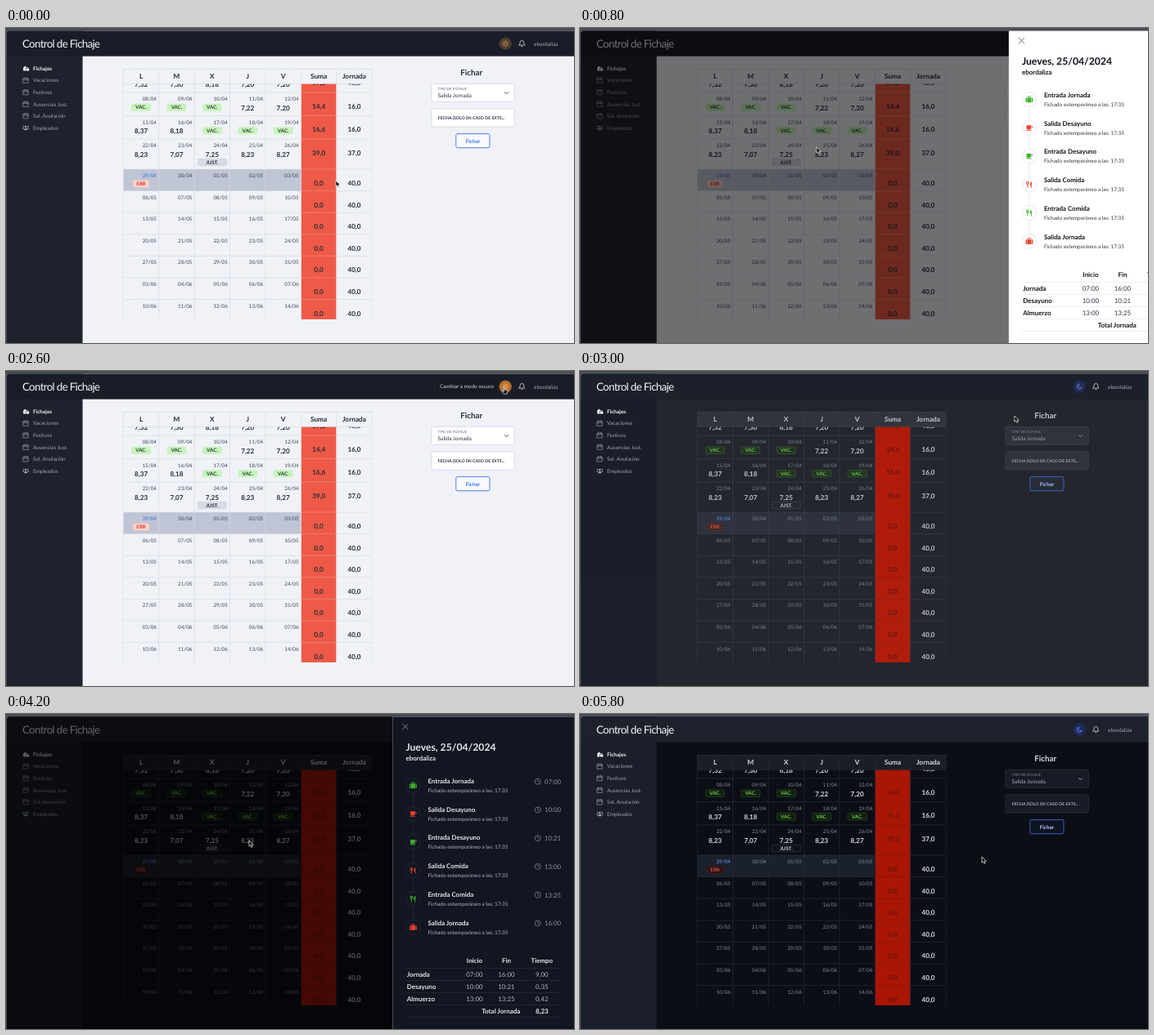
An HTML page that plays this animation: 694 by 386 pixels, repeating every 5.9 s.

```html
<!DOCTYPE html>
<html lang="es">
<head>
<meta charset="utf-8">
<title>Control de Fichaje</title>
<style>
html, body { margin: 0; width: 100%; height: 100%; overflow: hidden; background: #4b4e54; }
svg { display: block; width: 100vw; height: 100vh; font-family: Lato, "Open Sans", sans-serif; text-rendering: geometricPrecision; }
</style>
</head>
<body>
<svg id="stage" viewBox="0 0 694 386" preserveAspectRatio="none"></svg>
<script>
const LOOP = 5900, PANEL = 222, USER = 'ebordaliza';
const GREEN = '#3fae2e', RED = '#e8412f';

const light = {
  page: '#f0f2f8', bar: '#191d27', side: '#1e222d', head: '#f0f2f8', line: '#d9dce5',
  text: '#262c3a', date: '#3c4353', today: '#c0c5d5', todayDate: '#2f6be6',
  red: '#ee5a47', redText: '#2f2c38', redLine: '#f58a7b',
  vac: ['#c8f3bd', '#c8f3bd', '#28452a'], err: ['#fbd5cf', '#f3bdb4', '#d8321f'],
  just: ['#d9dce7', '#c9cdda', '#262c3a'],
  field: '#ffffff', fieldLine: '#cfd3dd', label: '#5a6070', value: '#2b3140',
  button: '#f8faff', blue: '#3a6fe6', buttonText: '#3a6fe6',
  disc: '#493c31', glyph: '#f0a04b',
  panel: '#ffffff', title: '#10131a', sub: '#2f3542', ring: '#e1e4ea', rule: '#e3e5ea', mute: '#5b6270'
};
const dark = {
  page: '#0c0e16', bar: '#1c212b', side: '#1a1f29', head: '#191e27', line: '#272b34',
  text: '#d3d7e0', date: '#868c98', today: '#1b212c', todayDate: '#6f9bf5',
  red: '#a91604', redText: '#6a150f', redLine: '#8c1509',
  vac: ['#10200f', '#2d5423', '#74c552'], err: ['#2a1412', '#4d211b', '#d8533c'],
  just: ['#0f131b', '#3b414d', '#d3d7e0'],
  field: '#161b25', fieldLine: '#2b313d', label: '#858b97', value: '#a8aeba',
  button: '#0e1420', blue: '#4169d8', buttonText: '#b9ccff',
  disc: '#1c2a5c', glyph: '#6488f5',
  panel: '#121621', title: '#e2e5ea', sub: '#b0b5bf', ring: '#262c37', rule: '#282e39', mute: '#8d939e'
};

const rect = (x, y, w, h, fill, extra = '') =>
  `<rect x="${x}" y="${y}" width="${w}" height="${h}" fill="${fill}" ${extra}/>`;
const path = (d, color, width = .8) =>
  `<path d="${d}" fill="none" stroke="${color}" stroke-width="${width}" stroke-linecap="round" stroke-linejoin="round"/>`;
const shape = (d, color) => `<path d="${d}" fill="${color}"/>`;
const at = (x, y, body, scale = 1) => `<g transform="translate(${x} ${y}) scale(${scale})">${body}</g>`;
// y is the middle of the capitals
const text = (x, y, s, size, fill, weight = 400, anchor = 'start', extra = '') =>
  `<text x="${x}" y="${y + size * .36}" font-size="${size}" fill="${fill}" font-weight="${weight}" text-anchor="${anchor}" ${extra}>${s}</text>`;
const mid = (x, y, s, size, fill, weight = 700) => text(x, y, s, size, fill, weight, 'middle');

const icons = {
  bag: c => path('M-1.3 -2V-3.4H1.3V-2', c, .8) + rect(-3.9, -2, 1.2, 5.2, c, 'rx=".5"') +
    rect(-2.2, -2, 4.4, 5.2, c) + rect(2.7, -2, 1.2, 5.2, c, 'rx=".5"'),
  cup: c => shape('M-3 -2.8H1.8V.2Q1.8 1.6 .4 1.6H-1.6Q-3 1.6 -3 .2ZM-3.6 2.2H2.8L2.2 3H-3Z', c) +
    path('M1.8 -2H2.5Q3.5 -2 3.5 -1T2.5 0H1.8', c, .8),
  food: c => path('M-2.9 -3V-1.2Q-2.9 0 -1.8 0T-.7 -1.2V-3M-1.8 -3V3.2', c, .8) +
    shape('M2.6 -3.3V3.5H1.8V.8H.7Q.6 -2.6 2.6 -3.3Z', c),
  calendar: c => path('M-3 -2.5H3V3.1H-3ZM-3 -.7H3M-1.4 -3.4V-2M1.4 -3.4V-2', c, .65),
  people: c => [[0, -1.4, 1.2], [-2.7, -1.7, .8], [2.7, -1.7, .8]]
    .map(([x, y, r]) => `<circle cx="${x}" cy="${y}" r="${r}" fill="${c}"/>`).join('') +
    shape('M-2.2 2.8Q-2 .4 0 .4T2.2 2.8ZM-4.1 1.3Q-3.9 -.4 -2.6 -.4L-2 .3L-2.8 1.3ZM4.1 1.3Q3.9 -.4 2.6 -.4L2 .3L2.8 1.3Z', c),
  entry: c => shape('M-3.8 0L-1 -3.2L1.6 -.6H-.4V3H-3V0Z', c) + rect(.2, .2, 3.8, 2.8, c, 'rx=".5"') +
    path('M1.2 0V-.9H3V0', c, .6),
  clock: c => `<circle r="3.5" fill="none" stroke="${c}" stroke-width=".7"/>` + path('M0 -2V0L1.3 .8', c, .7),
  bell: c => path('M-3.4 2H3.4Q2.4 1 2.4 -1Q2.4 -3.7 0 -3.7T-2.4 -1Q-2.4 1 -3.4 2ZM-.9 3.4Q0 4.3 .9 3.4', c, .75)
};

const colX = i => 143.4 + i * 43.4;
const weeks = [
  [50.5, '7,32 7,30 8,18 7,20 7,20', '37,2', '40,0'],
  [79, 'VAC. VAC. VAC. 7,22 7,20', '14,4', '16,0'],
  [107.5, '8,37 8,18 VAC. VAC. VAC.', '16,6', '16,0'],
  [136, '8,23 7,07 7,25+ 8,23 8,27', '39,0', '37,0'],
  [173, 'ERR', '0,0', '40,0']
];
for (let i = 1; i <= 6; i++) weeks.push([173 + 26.6 * i, '', '0,0', '40,0']);

function dayLabel(week, day) {
  const d = new Date(Date.UTC(2024, 3, 1 + week * 7 + day));
  const two = n => String(n).padStart(2, '0');
  return two(d.getUTCDate()) + '/' + two(d.getUTCMonth() + 1);
}

const badge = (x, y, w, label, [bg, border, color]) =>
  rect(x - w / 2, y - 4.3, w, 8.6, bg, `rx="1.2" stroke="${border}" stroke-width=".6"`) + mid(x, y, label, 6.2, color);

function cell(c, x, y, value) {
  if (value === 'VAC.') return badge(x, y + 18.2, 23, value, c.vac);
  if (value === 'ERR') return badge(x, y + 18, 19.5, value, c.err);
  if (!value) return '';
  return mid(x, y + 18.7, value.replace('+', ''), 8.2, c.text) +
    (value.endsWith('+') ? badge(x, y + 28.5, 35, 'JUST.', c.just) : '');
}

function calendar(c) {
  let s = rect(colX(0), 173, 217, 26.6, c.today) + rect(colX(5) + .5, 50, 42.6, 308, c.red);
  weeks.forEach(([y, days, sum, hours], w) => {
    const values = days.split(' ');
    s += path(`M${colX(0)} ${y}H${colX(5)}M${colX(6)} ${y}H${colX(7)}`, c.line, .7);
    s += path(`M${colX(5) + .5} ${y}H${colX(6) - .5}`, c.redLine, .7);
    for (let d = 0; d < 5; d++) {
      const isToday = w === 4 && d === 0;
      s += text(colX(d) + 40.6, y + 7.8, dayLabel(w, d), 6.25, isToday ? c.todayDate : c.date, 400, 'end');
      s += cell(c, colX(d) + 21.7, y, values[d]);
    }
    s += mid(colX(5) + 21.7, y + 17, sum, 8.3, c.redText) + mid(colX(6) + 21.7, y + 17, hours, 8.2, c.text);
  });
  for (let i = 0; i < 8; i++) s += path(`M${colX(i)} 50V358`, c.line, .7);
  s += rect(colX(0), 50.4, 303.8, 17.8, c.head, `stroke="${c.line}" stroke-width=".7"`);
  ['L', 'M', 'X', 'J', 'V', 'Suma', 'Jornada'].forEach((name, i) => {
    s += mid(colX(i) + 21.7, 59, name, 8.3, c.text);
    if (i) s += path(`M${colX(i)} 50.4V68`, c.line, .7);
  });
  return `<g clip-path="url(#tableClip)">${s}</g>`;
}

function sidebar() {
  const items = [['Fichajes', 'entry'], ['Vacaciones', 'calendar'], ['Festivos', 'calendar'],
    ['Ausencias Just.', 'calendar'], ['Sol. Anulación', 'calendar'], ['Empleados', 'people']];
  return items.map(([label, icon], i) => {
    const y = 49.6 + i * 14.55, color = i ? '#9ca2ae' : '#f4f5f8';
    return at(24.2, y, icons[icon](color)) + text(33, y, label, 6.45, color, i ? 400 : 700);
  }).join('');
}

function sun(color) {
  let rays = '';
  for (let i = 0; i < 8; i++) {
    const a = i * Math.PI / 4, x = Math.cos(a), y = Math.sin(a);
    rays += `M${x * 2.9} ${y * 2.9}L${x * 3.9} ${y * 3.9}`;
  }
  return `<circle r="1.8" fill="none" stroke="${color}" stroke-width=".8"/>` + path(rays, color, .8);
}
const moon = color => path('M-.5 -3A3.1 3.1 0 1 0 3 .8A2.6 2.6 0 0 1 -.5 -3Z', color, .8);

function form(c) {
  const box = (y, h) => rect(520, y, 101.3, h, c.field, `rx="2" stroke="${c.fieldLine}" stroke-width=".8"`);
  return mid(568.7, 54.7, 'Fichar', 9.8, c.text) +
    box(68.3, 22) + text(527.6, 74.9, 'TIPO DE FICHAJE', 4.4, c.label) +
    text(527.6, 83, 'Salida Jornada', 6.6, c.value) + path('M609.6 78.6L611.6 80.6L613.6 78.6', c.value, .9) +
    box(98.8, 22.2) + text(527.8, 110, 'FECHA (SOLO EN CASO DE EXTE...', 5.15, c.value, 700) +
    rect(549.8, 129.6, 41.2, 17.2, c.button, `rx="2" stroke="${c.blue}" stroke-width=".9"`) +
    mid(570.4, 138.2, 'Fichar', 6.4, c.buttonText);
}

function page(c) {
  return rect(0, 3, 694, 383, c.page) + rect(0, 3, 93.6, 383, c.side) + rect(0, 3, 694, 31.6, c.bar) +
    text(20, 19.2, 'Control de Fichaje', 13.3, '#f2f3f6', 400, 'start', 'letter-spacing="-.65"') +
    `<circle cx="610.2" cy="19.2" r="7.6" fill="${c.disc}"/>` +
    at(610.2, 19.2, c === dark ? moon(c.glyph) : sun(c.glyph)) +
    at(630.4, 19, icons.bell('#d9dce3')) + text(645, 19.2, USER, 6.55, '#a4a9b4') +
    sidebar() + calendar(c) + form(c);
}

const events = [
  ['Entrada Jornada', 'bag', '07:00'], ['Salida Desayuno', 'cup', '10:00'], ['Entrada Desayuno', 'cup', '10:21'],
  ['Salida Comida', 'food', '13:00'], ['Entrada Comida', 'food', '13:25'], ['Salida Jornada', 'bag', '16:00']
];
const totals = [['Jornada', '07:00', '16:00', '9,00'], ['Desayuno', '10:00', '10:21', '0,35'], ['Almuerzo', '13:00', '13:25', '0,42']];

function panel(c) {
  let s = rect(0, 3, PANEL + 2, 383, c.panel) + path('M12.2 12.2L18.8 18.8M18.8 12.2L12.2 18.8', c.mute, .9) +
    text(16, 41, 'Jueves, 25/04/2024', 12.2, c.title, 700) + text(16, 54.6, USER, 8, c.title, 700) +
    path('M25 88V261', c.ring, .8);
  events.forEach(([name, icon, time], i) => {
    const y = 82 + i * 34.75, color = name.startsWith('Entrada') ? GREEN : RED;
    s += `<circle cx="25" cy="${y + 5.6}" r="8.8" fill="${c.panel}" stroke="${c.ring}" stroke-width=".8"/>` +
      at(25, y + 5.6, icons[icon](color), 1.12) + text(43, y, name, 7.9, c.title, 700) +
      text(43, y + 11.5, 'Fichado extemporáneo a las: 17:35', 6.4, c.sub) +
      at(177.3, y + .7, icons.clock(c.mute)) + text(185.6, y + .8, time, 7.8, c.mute);
  });
  const cols = [100, 139, 182.4];
  ['Inicio', 'Fin', 'Tiempo'].forEach((h, i) => s += mid(cols[i], 302.6, h, 7.9, c.title));
  totals.forEach(([name, ...values], i) => {
    const y = 319 + i * 15;
    s += text(17.4, y, name, 8, c.title, 700) + values.map((v, j) => mid(cols[j], y, v, 7.9, c.sub, 400)).join('');
  });
  for (let i = 0; i < 5; i++) s += path(`M16 ${311.5 + i * 15}H206`, c.rule, .7);
  return s + text(156, 364, 'Total Jornada', 8, c.title, 700, 'end') + mid(cols[2], 364, '8,23', 8, c.title);
}

const stage = document.getElementById('stage');
stage.innerHTML = `<defs>
  <clipPath id="appClip"><rect x="1" y="3.4" width="720" height="400" rx="4"/></clipPath>
  <clipPath id="tableClip"><rect x="143" y="50" width="304.6" height="307"/></clipPath></defs>
  ${rect(0, 0, 694, 386, '#4b4e54')}
  <g clip-path="url(#appClip)">
    <g>${page(light)}</g><g id="darkPage">${page(dark)}</g>
    <g id="hover"><circle cx="610.2" cy="19.2" r="7.6" fill="#b8702f"/>${at(610.2, 19.2, sun('#ffc27a'))}</g>
    <g id="tip">${rect(526, 11, 74, 16, '#171a23', 'rx="2"')}${mid(563, 19, 'Cambiar a modo oscuro', 6.4, '#d0d3da', 400)}</g>
    ${rect(0, 3, 694, 383, '#000', 'id="mask"')}
    <g id="panel"><g>${panel(light)}</g><g id="darkPanel">${panel(dark)}</g></g>
  </g>
  <g id="arrow"><path d="M0 0V7.2L1.7 5.7L2.9 8.3L4.2 7.7L3 5.2H5.3Z" fill="#000" stroke="#fff" stroke-width=".7"/></g>
  <g id="hand"><path d="M-.7 .2Q0 -.6 .7 .2V3L3.4 3.6Q4.1 3.9 3.9 4.8L3.2 8H-.9L-3 5Q-2.6 4 -1.6 4.6L-.7 5.3Z" fill="#111" stroke="#fff" stroke-width=".7"/></g>`;
const el = Object.fromEntries([...stage.querySelectorAll('g[id], rect[id]')].map(n => [n.id, n]));

const clamp = v => Math.min(1, Math.max(0, v));
const ramp = (t, a, b) => clamp((t - a) / (b - a));
const smooth = u => u * u * (3 - 2 * u);

// cubic-bezier(.4, 0, .2, 1)
function glide(x) {
  let lo = 0, hi = 1;
  for (let i = 0; i < 20; i++) {
    const s = (lo + hi) / 2, r = 1 - s;
    if (1.2 * s * r * r + .6 * s * s * r + s * s * s < x) lo = s; else hi = s;
  }
  return lo * lo * (3 - 2 * lo);
}

// open start, open end, close start, close end
const visits = [[529, 1079, 1363, 1863], [3682, 4232, 4948, 5288]];

const route = [
  [50, 403, 187], [400, 289, 146], [850, 289, 146], [1200, 293, 195], [1490, 293, 195], [2450, 609, 20],
  [2850, 609, 20], [3300, 308, 155], [3500, 297, 155], [5400, 297, 155], [5800, 491, 175]
];
function pointer(t) {
  const next = route.findIndex(k => k[0] > t);
  if (next <= 0) return (next ? route[route.length - 1] : route[0]).slice(1);
  const a = route[next - 1], b = route[next], u = smooth(ramp(t, a[0], b[0]));
  return [a[1] + (b[1] - a[1]) * u, a[2] + (b[2] - a[2]) * u];
}

function draw(t) {
  const night = smooth(ramp(t, 2760, 3060));
  let open = 0, shade = 0;
  for (const [a, b, c, d] of visits) {
    open += glide(ramp(t, a, b)) - glide(ramp(t, c, d));
    shade += ramp(t, a, a + 300) - ramp(t, c, c + 170);
  }
  el.darkPage.setAttribute('opacity', night);
  el.darkPanel.setAttribute('opacity', night);
  el.mask.setAttribute('opacity', .6 * clamp(shade));
  el.panel.setAttribute('transform', `translate(${694 - PANEL * open} 0)`);
  el.panel.setAttribute('visibility', open > .001 ? 'visible' : 'hidden');
  el.hover.setAttribute('opacity', ramp(t, 2400, 2500) - ramp(t, 2750, 2900));
  el.tip.setAttribute('opacity', ramp(t, 2510, 2590) - ramp(t, 2850, 2950));

  const [x, y] = pointer(t), pointing = t >= 2550 && t < 2880;
  el.arrow.setAttribute('transform', `translate(${x} ${y})`);
  el.hand.setAttribute('transform', `translate(${x} ${y})`);
  el.arrow.setAttribute('visibility', pointing ? 'hidden' : 'visible');
  el.hand.setAttribute('visibility', pointing ? 'visible' : 'hidden');
}

let start = null;
function tick(now) {
  if (start === null) start = now;
  draw((now - start) % LOOP);
  requestAnimationFrame(tick);
}
draw(0);
requestAnimationFrame(tick);
</script>
</body>
</html>
```
